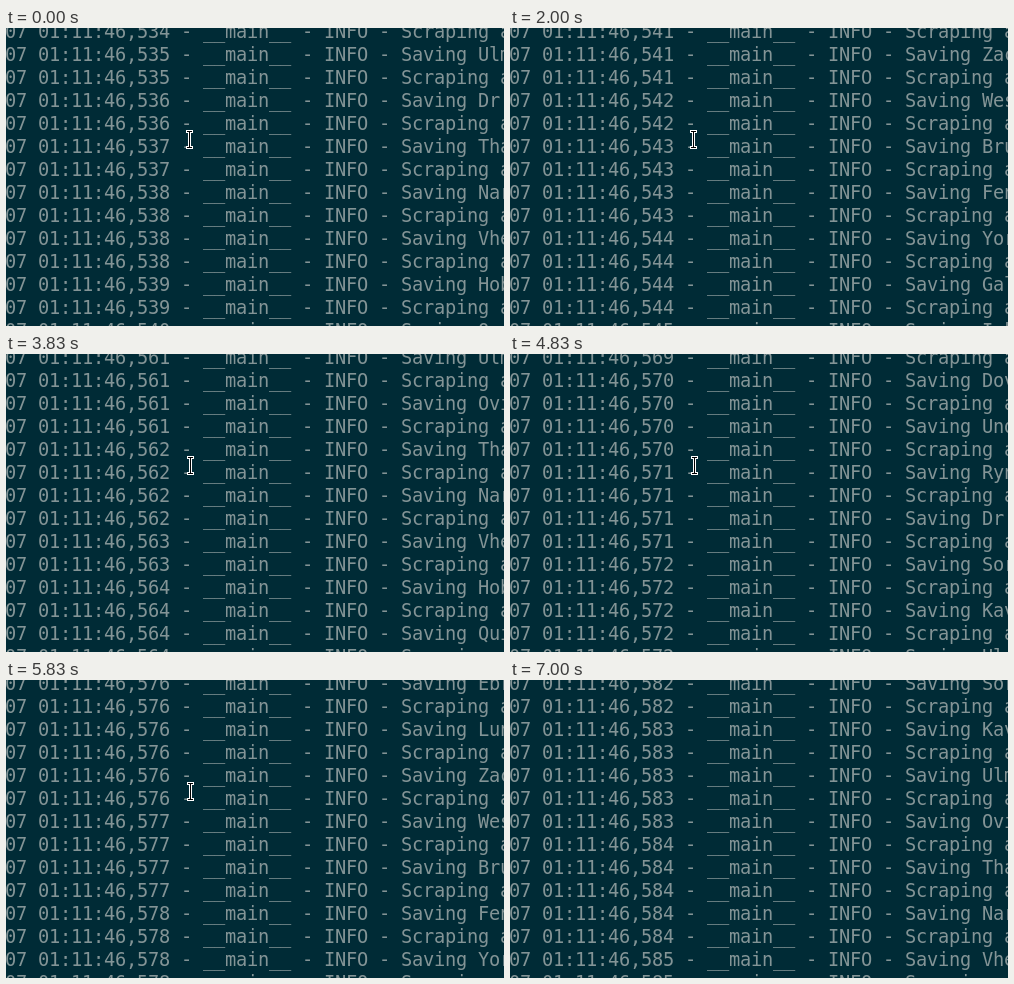
An HTML page that plays this animation: 498 by 298 pixels, repeating every 7340 ms.

```html
<!DOCTYPE html>
<html lang="en">
<head>
<meta charset="utf-8">
<title>Scraper log</title>
<style>
  html, body { margin: 0; width: 100%; height: 100%; overflow: hidden; background: #002b36; }
  #stage { position: relative; width: 498px; height: 298px; overflow: hidden; }
  #log {
    position: absolute; left: -1px; top: -8px; margin: 0;
    font: 18.667px/23px "DejaVu Sans Mono", monospace;
    color: #839496; white-space: pre;
    animation: scroll 7340ms step-end infinite;
  }
  svg { position: absolute; left: 0; top: 0; overflow: visible; }
  #beam { animation: beam 7340ms step-end infinite; }
  #arrow { translate: 89px 13px; animation: arrow 7340ms step-end infinite; }

  /* one unit of the multiplier is one log line */
  @keyframes scroll {
    0%      { transform: translateY(0); }
    18.119% { transform: translateY(calc(-23px * 6)); }
    20.435% { transform: translateY(calc(-23px * 12)); }
    27.247% { transform: translateY(calc(-23px * 18)); }
    34.059% { transform: translateY(calc(-23px * 28)); }
    36.376% { transform: translateY(calc(-23px * 35)); }
    40.871% { transform: translateY(calc(-23px * 47)); }
    45.367% { transform: translateY(calc(-23px * 63)); }
    47.683% { transform: translateY(calc(-23px * 78)); }
    52.179% { transform: translateY(calc(-23px * 93)); }
    58.991% { transform: translateY(calc(-23px * 115)); }
    63.623% { transform: translateY(calc(-23px * 120)); }
    65.803% { transform: translateY(calc(-23px * 126)); }
    68.119% { transform: translateY(calc(-23px * 135)); }
    72.615% { transform: translateY(calc(-23px * 144)); }
    79.427% { transform: translateY(calc(-23px * 153)); }
    81.743% { transform: translateY(calc(-23px * 162)); }
    86.239% { transform: translateY(calc(-23px * 171)); }
    88.555%, 100% { transform: translateY(calc(-23px * 181)); }
  }
  @keyframes beam {
    0%      { transform: translate(180px, 102px); visibility: visible; }
    47.683% { transform: translate(181px, 102px); visibility: visible; }
    84.059% { transform: translate(177px, 97px); visibility: visible; }
    86.239% { transform: translate(165px, 87px); visibility: visible; }
    88.555% { transform: translate(140px, 65px); visibility: visible; }
    90.871% { transform: translate(102px, 28px); visibility: visible; }
    93.051%, 100% { transform: translate(102px, 28px); visibility: hidden; }
  }
  @keyframes arrow {
    0%      { visibility: hidden; }
    93.051% { visibility: visible; }
    95.367%, 100% { visibility: hidden; }
  }
</style>
</head>
<body>
<div id="stage">
  <pre id="log"></pre>
  <svg id="beam" width="8" height="19" fill="none" stroke-linecap="square">
    <path d="M1.5 1.5H5.5M3.5 1.5V17.5M1.5 17.5H5.5" stroke="#fff" stroke-width="3"/>
    <path d="M1.5 1.5H5.5M3.5 1.5V17.5M1.5 17.5H5.5" stroke="#000"/>
  </svg>
  <svg id="arrow" width="12" height="20">
    <path d="M.5 .5V16.5L4.3 13L7 19.2L9.2 18.3L6.6 12.2H11.5Z" fill="#000" stroke="#fff"/>
  </svg>
</div>
<script>
  const CELL = 11, LINES = 195;
  // lines logged per millisecond, where it is not 4
  const bursts = { 534: 1, 535: 2, 536: 2, 537: 2, 539: 2, 542: 2, 549: 2, 563: 2,
                   572: 6, 576: 6, 583: 5, 584: 5 };
  const names = ("Ulm Ovi Tha Nar Vhe Hob Qui Ebr Lun Zac Wes Bru Fen Yor Gal Isk Pel " +
                 "Dov Und Ryn Mil Sor Kav").split(" ");
  const doctors = [1, 23, 24, 66];

  const rows = [];
  for (let ms = 534; rows.length < LINES; ms++) {
    for (let n = bursts[ms] || 4; n > 0; n--) {
      const i = rows.length, entry = i >> 1;
      const name = doctors.includes(entry) ? "Dr " : names[entry % names.length];
      const task = i % 2 ? "Saving " + name : "Scraping a";
      rows.push(`07 01:11:46,${ms} - __main__ - INFO - ${task}`);
    }
  }

  // keep glyphs on whole-pixel terminal cells
  const log = document.getElementById("log");
  const probe = document.createElement("span");
  probe.textContent = "0".repeat(50);
  log.append(probe);
  const advance = probe.getBoundingClientRect().width / 50;
  log.style.letterSpacing = CELL - advance + "px";
  log.textContent = rows.join("\n");
</script>
</body>
</html>
```
